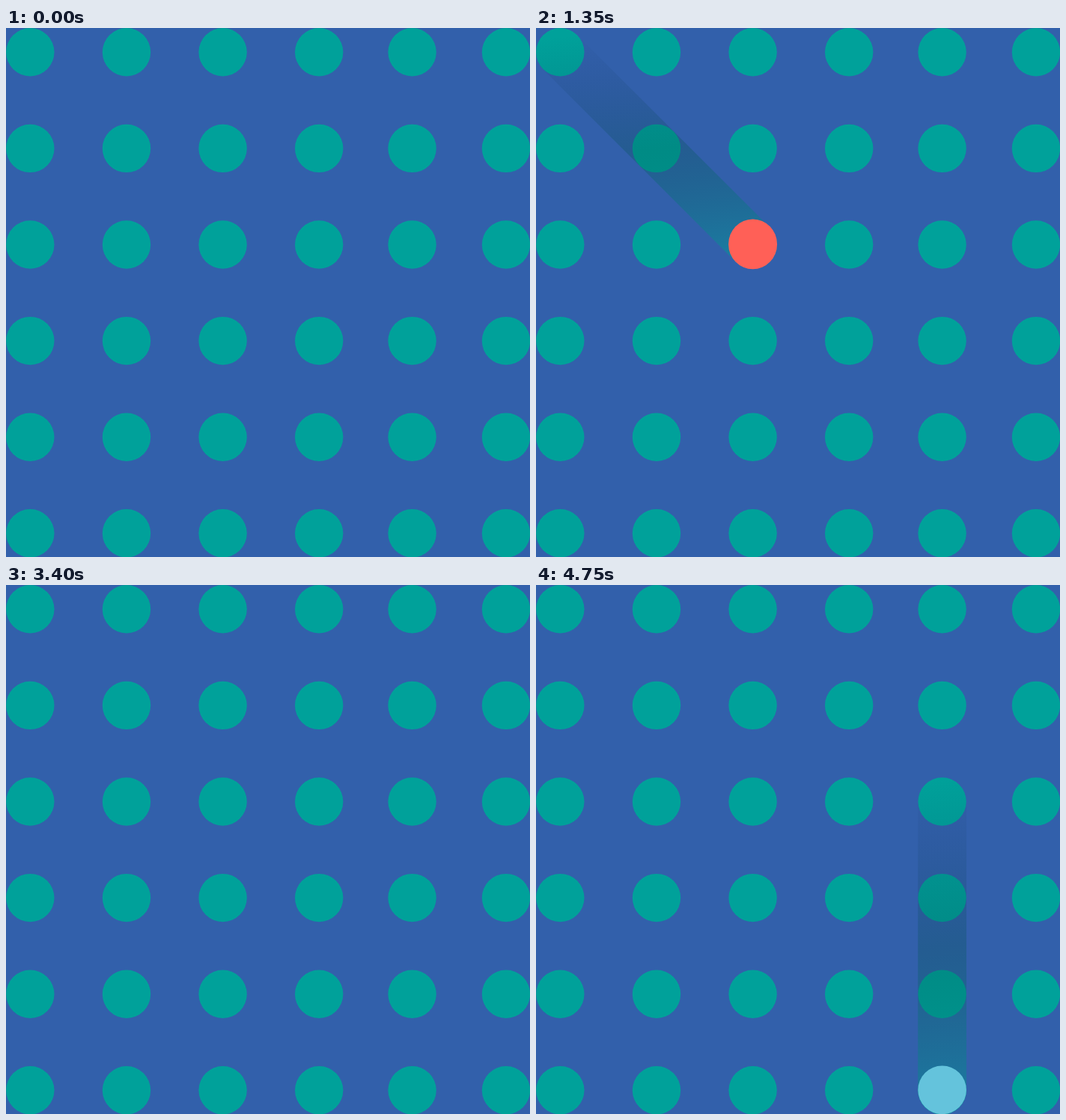
Write an HTML page with a canvas that moves like this. It is 700 by 707 pixels and loops after 5.25 s.

```html
<!DOCTYPE html>
<html lang="en">
<head>
<meta charset="utf-8">
<title>Dot grid</title>
<style>
  html, body { margin: 0; width: 100%; height: 100%; overflow: hidden; background: #3260ab; }
  canvas { display: block; width: 700px; height: 707px; }
</style>
</head>
<body>
<canvas id="stage" width="700" height="707"></canvas>
<script>
const ctx = document.getElementById('stage').getContext('2d');
const COLS = [32.3, 161, 289.6, 418.2, 542.6, 668];
const ROWS = COLS.map((_, i) => 32.3 + 128.6 * i);
const R = 32.2;
const STEP = 150;
const LOOP = 5250;

// Each move: start time, steps until the last dot lights up, cells as [column, row]
const MOVES = [
  { start: 0, steps: 9, from: [0, 0], to: [2, 2], color: '#ff6057', rx: 32.5, ry: 33.4, dy: -0.6 },
  { start: 1850, steps: 7, from: [2, 2], to: [2, 4], color: '#f2be45', rx: 32.5, ry: 33.4, dy: -0.6 },
  { start: 3400, steps: 9, from: [4, 2], to: [4, 5], color: '#64c3dc', rx: 32.3, ry: 32.3, dy: -0.4 }
];

const point = ([col, row]) => ({ x: COLS[col], y: ROWS[row] });
const easeOut = u => u * (1.23 - 0.23 * u);

function oval(x, y, rx, ry, color) {
  ctx.fillStyle = color;
  ctx.beginPath();
  ctx.ellipse(x, y, rx, ry, 0, 0, Math.PI * 2);
  ctx.fill();
}

function trail(a, b) {
  const top = a.y - R;
  const bottom = b.y + R;
  const mid = (a.x + b.x) / 2;
  const tilt = (bottom - top) * 0.05;
  const fade = ctx.createLinearGradient(mid - tilt, top, mid + tilt, bottom);
  fade.addColorStop(0, 'rgba(20,40,90,0)');
  fade.addColorStop(0.5, 'rgba(0,82,78,0.28)');
  fade.addColorStop(1, 'rgba(0,161,154,0.48)');
  ctx.strokeStyle = fade;
  ctx.lineWidth = R * 2 + 0.4;
  ctx.lineCap = 'round';
  ctx.beginPath();
  ctx.moveTo(a.x, a.y);
  ctx.lineTo(b.x, b.y);
  ctx.stroke();
}

function draw(time) {
  ctx.fillStyle = '#3260ab';
  ctx.fillRect(0, 0, 700, 707);
  for (const y of ROWS) for (const x of COLS) oval(x, y, R, R, '#00a19a');

  const move = MOVES.findLast(m => time >= m.start);
  const step = Math.min(move.steps, Math.floor((time - move.start) / STEP));
  if (step === 0) return;

  const a = point(move.from);
  const b = point(move.to);
  const p = easeOut(step / move.steps);
  trail(a, { x: a.x + (b.x - a.x) * p, y: a.y + (b.y - a.y) * p });
  if (step === move.steps) oval(b.x, b.y + move.dy, move.rx, move.ry, move.color);
}

const begin = performance.now();
function tick() {
  draw((performance.now() - begin) % LOOP);
  requestAnimationFrame(tick);
}
tick();
</script>
</body>
</html>
```
